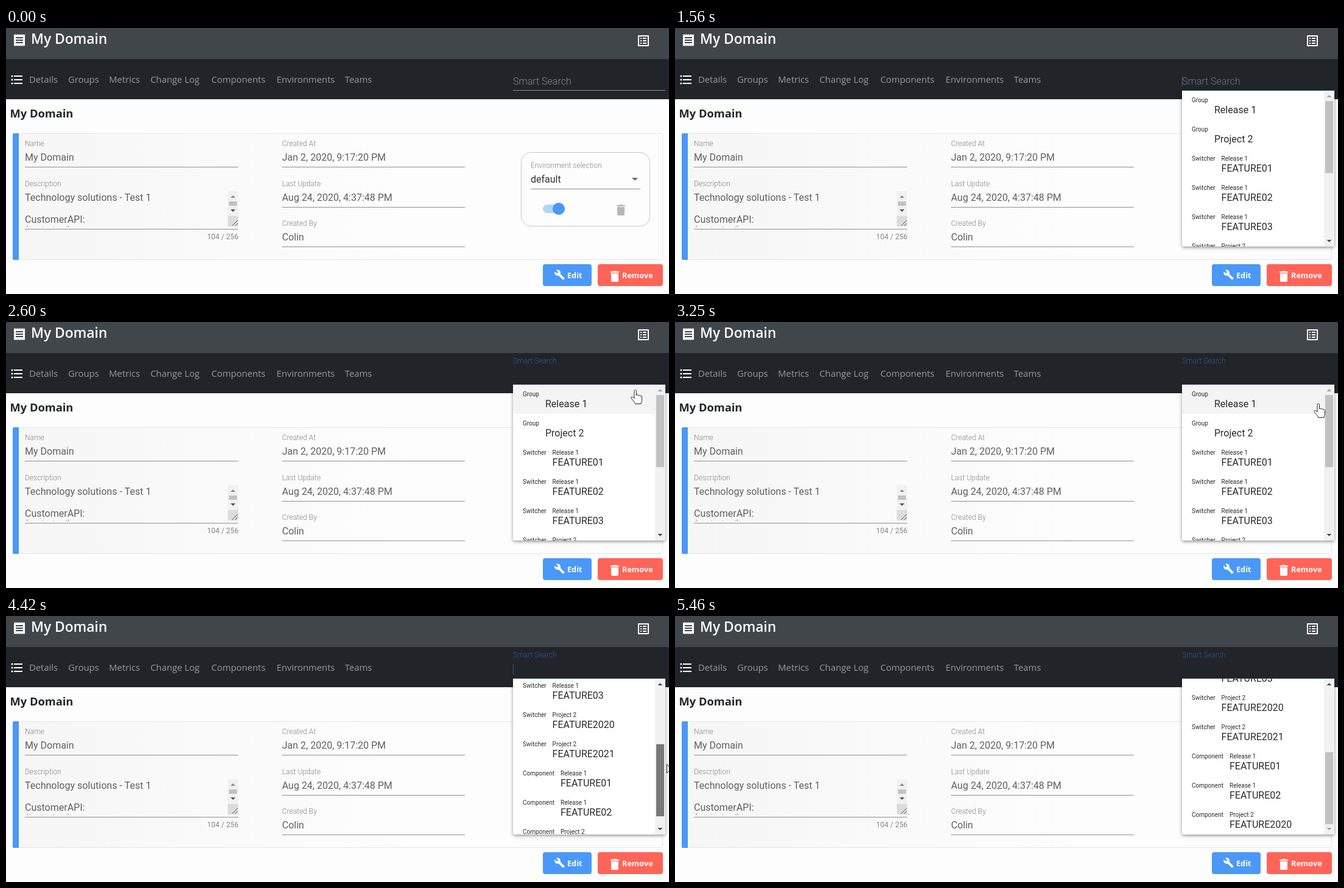
Recreate the animation shown at these times as an HTML page. Size 1088 by 437 pixels, loop 5590 ms.

```html
<!DOCTYPE html>
<html lang="en">
<head>
<meta charset="utf-8">
<title>Domain smart search</title>
<style>
  html, body { margin: 0; width: 100%; height: 100%; overflow: hidden; background: #fdfdfd; }
  svg { display: block; }
  text { font-family: Roboto, "Liberation Sans", sans-serif; font-size: 16px; white-space: pre; }
  .ui text, text.ui { font-family: "Open Sans", "Noto Sans", sans-serif; }
  .nav text { font-size: 14.8px; fill: #96999c; }
  .value text { fill: #606060; }
  .label text { font-size: 12px; font-weight: 300; fill: #858585; }
  .rule { stroke: #909090; }
  .button text { font-size: 12.7px; font-weight: 700; fill: #fff; }
  .tip text { font-size: 10px; fill: #fff; stroke: #fff; stroke-width: .3px; }
  .row text { fill: #2b2b2b; }
  .row .small { font-size: 10px; }
  #panelBox { filter: drop-shadow(0 2px 2px rgba(0,0,0,.25)) drop-shadow(0 1px 3px rgba(0,0,0,.2)); }
  .cursor { fill: #fff; stroke: #222; stroke-width: 1; stroke-linejoin: round; }
</style>
</head>
<body>
<svg width="1088" height="437" viewBox="0 0 1088 437">
  <defs>
    <linearGradient id="cardFill">
      <stop offset="0" stop-color="#f6f6f6"/>
      <stop offset=".6" stop-color="#fdfdfd"/>
    </linearGradient>
    <clipPath id="panelClip"><rect x="832" y="103" width="250" height="256" rx="3"/></clipPath>
    <clipPath id="areaClip"><rect x="31" y="268" width="333" height="58.5"/></clipPath>
    <path id="bin" d="M6 19c0 1.1.9 2 2 2h8c1.1 0 2-.9 2-2V7H6v12zM19 4h-3.5l-1-1h-5l-1 1H5v2h14V4z"/>
  </defs>

  <!-- header and navigation -->
  <rect width="1088" height="51" fill="#41464b"/>
  <rect y="51" width="1088" height="66" fill="#212529"/>
  <g fill="#fff">
    <path transform="translate(10 8)" d="M18 17H6v-2h12v2zm0-4H6v-2h12v2zm0-4H6V7h12v2zM3 22l1.5-1.5L6 22l1.5-1.5L9 22l1.5-1.5L12 22l1.5-1.5L15 22l1.5-1.5L18 22l1.5-1.5L21 22V2l-1.5 1.5L18 2l-1.5 1.5L15 2l-1.5 1.5L12 2l-1.5 1.5L9 2 7.5 3.5 6 2 4.5 3.5 3 2v20z"/>
    <path transform="translate(1034 9)" d="M19 5v14H5V5h14m1.1-2H3.9c-.5 0-.9.4-.9.9v16.2c0 .4.4.9.9.9h16.2c.4 0 .9-.5.9-.9V3.9c0-.5-.5-.9-.9-.9zM11 7h6v2h-6V7zm0 4h6v2h-6v-2zm0 4h6v2h-6zM7 7h2v2H7zm0 4h2v2H7zm0 4h2v2H7z"/>
    <g transform="translate(6 73)">
      <circle cx="4" cy="6" r="1.5"/><circle cx="4" cy="12" r="1.5"/><circle cx="4" cy="18" r="1.5"/>
      <path d="M7 5h14v2H7zM7 11h14v2H7zM7 17h14v2H7z"/>
    </g>
    <text class="ui" x="41" y="26" style="font-size:22.7px;font-weight:600">My Domain</text>
  </g>
  <g class="ui nav">
    <text x="38" y="90">Details</text>
    <text x="102" y="90">Groups</text>
    <text x="169" y="90">Metrics</text>
    <text x="237" y="90">Change Log</text>
    <text x="337" y="90">Components</text>
    <text x="444" y="90">Environments</text>
    <text x="556" y="90">Teams</text>
  </g>
  <rect id="searchLine" x="832" y="102" width="250" height="1"/>
  <text id="searchLabel" font-weight="300">Smart Search</text>
  <rect id="caret" x="832" y="79" width="1" height="17" fill="#3a5a8c"/>

  <!-- domain card -->
  <text class="ui" x="6.500" y="147" fill="#212529" style="font-size:18.3px;font-weight:700">My Domain</text>
  <rect x="11.500" y="173.500" width="1066" height="207" rx="2" fill="url(#cardFill)" stroke="#e6e6e6"/>
  <path d="M13 173h8v208h-8a2 2 0 0 1-2-2V175a2 2 0 0 1 2-2z" fill="#4a98f7"/>
  <g class="label">
    <text x="31" y="194">Name</text>
    <text x="31" y="260">Description</text>
    <text x="453" y="194">Created At</text>
    <text x="453" y="260">Last Update</text>
    <text x="453" y="325">Created By</text>
    <text x="330" y="347" style="font-weight:400">104 / 256</text>
  </g>
  <g class="value">
    <text x="31" y="218">My Domain</text>
    <g clip-path="url(#areaClip)">
      <text x="31" y="284">Technology solutions - Test 1</text>
      <text x="31" y="320">CustomerAPI:</text>
      <text x="31" y="338">(technical)</text>
    </g>
    <text x="453" y="218">Jan 2, 2020, 9:17:20 PM</text>
    <text x="453" y="284">Aug 24, 2020, 4:37:48 PM</text>
    <text x="453" y="349">Colin</text>
  </g>
  <path class="rule" d="M31 228.500h350M31 330.500h350M453 228.500h300M453 294.500h300M453 359.500h300"/>
  <rect x="364" y="268" width="17" height="41" fill="#f1f1f1"/>
  <rect x="366" y="285" width="13" height="7" fill="#c1c1c1"/>
  <path d="M368.500 279l4-4 4 4z" fill="#8c8c8c"/>
  <path d="M368.500 298l4 4 4-4z" fill="#505050"/>
  <rect x="364" y="309" width="17" height="17" fill="#dcdcdc"/>
  <path d="M371 325l9-9M376 325l4-4" stroke="#555"/>

  <!-- environment box -->
  <rect x="845.500" y="204.500" width="211" height="121" rx="16" fill="#fdfdfd" stroke="#c6c6c6"/>
  <g class="label"><text x="861" y="230">Environment selection</text></g>
  <text x="861" y="254" fill="#333">default</text>
  <path class="rule" d="M861 264.500h180"/>
  <path d="M1027 246h10l-5 5z" fill="#707070"/>
  <rect x="881" y="290" width="36" height="14" rx="7" fill="#b0d5fb"/>
  <circle cx="907" cy="297" r="10" fill="#4a98f7"/>
  <use href="#bin" x="997" y="287" fill="#bab7b6"/>

  <g class="ui button">
    <rect x="881" y="388" width="80" height="36" rx="4" fill="#4a98f7"/>
    <path transform="translate(899.500 396.500) scale(.75)" fill="#fff" d="M22.700 19l-9.100-9.100c.9-2.300.4-5-1.500-6.900-2-2-5-2.400-7.400-1.300L9 6 6 9 1.600 4.700C.4 7.100.9 10.100 2.900 12.100c1.900 1.900 4.600 2.400 6.900 1.500l9.100 9.100c.4.4 1 .4 1.400 0l2.300-2.300c.5-.4.5-1.100.1-1.400z"/>
    <text x="921" y="411">Edit</text>
    <rect x="971" y="388" width="107" height="36" rx="4" fill="#ff6458"/>
    <use href="#bin" x="987" y="396" fill="#fff"/>
    <text x="1011" y="411">Remove</text>
  </g>

  <g id="tip" class="tip">
    <rect x="832" y="110" width="250" height="42" rx="4" fill="#616161" fill-opacity=".9"/>
    <text x="840" y="127">Use 'S:' for Switchers, 'G:' for Groups and 'C:' for</text>
    <text x="840" y="142">Components</text>
  </g>

  <!-- search results -->
  <g id="panel">
    <path id="panelBox" d="M832 103h250v253a3 3 0 0 1-3 3h-244a3 3 0 0 1-3-3z" fill="#fff"/>
    <g clip-path="url(#panelClip)">
      <g id="rows"><rect id="hover" x="832" y="103" width="233" height="48" fill="#f4f4f4"/></g>
      <rect x="1065" y="103" width="17" height="256" fill="#f1f1f1"/>
      <rect id="thumb" x="1067" width="13" height="118.400"/>
      <path id="up" d="M1069.500 114l4-4 4 4z"/>
      <path id="down" d="M1069.500 348l4 4 4-4z"/>
    </g>
  </g>
  <path id="hand" class="cursor" d="M0 2c0-2.500 3.500-2.500 3.500 0v7c.6-1.400 3-1.200 3.300.4.800-1.100 2.800-.8 3.100.7 1-.8 2.600-.2 2.600 1.400v5.500c0 2-1.500 3-1.500 6H1.500c0-2.500-4.500-6-6.500-9.500-1-1.800 1.300-3 2.700-1.700L0 14z"/>
  <path id="arrow" class="cursor" d="M.5.500v14.500l3.400-3.200 2.300 5.200 2.400-1-2.300-5.100h4.700z"/>
</svg>
<script>
const LOOP = 5590, STEP = 130;
const FOCUS = 1560, FLOAT = 650, BLINK = 1040;
const MAX_SCROLL = 224, THUMB_TRAVEL = 103.6;
const $ = id => document.getElementById(id);

const results = [
  ["Group", "", "Release 1"], ["Group", "", "Project 2"],
  ["Switcher", "Release 1", "FEATURE01"], ["Switcher", "Release 1", "FEATURE02"],
  ["Switcher", "Release 1", "FEATURE03"], ["Switcher", "Project 2", "FEATURE2020"],
  ["Switcher", "Project 2", "FEATURE2021"], ["Component", "Release 1", "FEATURE01"],
  ["Component", "Release 1", "FEATURE02"], ["Component", "Project 2", "FEATURE2020"]
];
const nameX = { Group: 885, Switcher: 896.6, Component: 910 };

$("rows").insertAdjacentHTML("beforeend", results.map(([kind, parent, name], i) => {
  const y = 103 + 48 * i, x = nameX[kind];
  return `<g class="row"><text class="small" x="848" y="${y + 19}">${kind}</text>` +
    `<text class="small" x="${x}" y="${y + 19}">${parent}</text>` +
    `<text x="${x}" y="${y + 37}">${name}</text></g>`;
}).join(""));

// Linear interpolation through [time, value] points
function track(points, t) {
  const i = points.findIndex(p => p[0] > t);
  if (i === 0) return points[0][1];
  if (i < 0) return points[points.length - 1][1];
  const [t0, v0] = points[i - 1], [t1, v1] = points[i];
  return v0 + (v1 - v0) * (t - t0) / (t1 - t0);
}

const scrollPath = [[3640, 0], [3770, 16], [3900, 49], [4420, 196], [4550, 214], [4680, MAX_SCROLL]];
const tipFade = [[520, 0], [650, .4], [780, .89], [910, 1]];
const handX = [[2600, 1031], [3120, 1050], [3250, 1054]];
const handY = [[2600, 111.500], [3120, 128], [3250, 134]];
const arrowX = [[3510, 1074], [3640, 1076], [3900, 1076], [4420, 1084], [4810, 1086], [5200, 1089]];

const show = (el, on) => el.setAttribute("visibility", on ? "visible" : "hidden");
const move = (el, x, y, s = 1) => el.setAttribute("transform", `translate(${x} ${y}) scale(${s})`);
const fill = (el, color) => el.setAttribute("fill", color);

function draw(t) {
  const focused = t >= FOCUS;

  const p = Math.min(Math.max((t - FOCUS) / FLOAT, 0), 1);
  const lift = 1 - (1 - p) ** 3;
  move($("searchLabel"), 832, 93 - 24.7 * lift, 1 - .25 * lift);
  fill($("searchLabel"), t < FOCUS ? "#868a8d" : p === 0 ? "#73777a" : "#34568c");
  fill($("searchLine"), focused ? "#2d4a78" : "#8d9093");
  show($("caret"), focused && (t - FOCUS) % (2 * BLINK) < BLINK);

  $("tip").setAttribute("opacity", focused ? 0 : track(tipFade, t));

  const scroll = track(scrollPath, t);
  const thumbY = 120 + scroll / MAX_SCROLL * THUMB_TRAVEL;
  const onBar = t >= 3510, drag = t >= 3640 && t < 5200;
  show($("panel"), focused);
  move($("rows"), 0, -scroll);
  $("hover").setAttribute("opacity", t >= 2600 && !onBar ? 1 : 0);
  $("thumb").setAttribute("y", thumbY);
  fill($("thumb"), drag ? "#787878" : onBar && t < 3640 ? "#a8a8a8" : "#c1c1c1");
  fill($("up"), scroll > 0 ? "#505050" : "#a3a3a3");
  fill($("down"), scroll < MAX_SCROLL ? "#505050" : "#a3a3a3");

  show($("hand"), t >= 2600 && !onBar);
  move($("hand"), track(handX, t), track(handY, t));
  show($("arrow"), onBar && t < 5200);
  move($("arrow"), track(arrowX, t), thumbY + 32.5);
}

const start = performance.now();
function tick() {
  const t = (performance.now() - start) % LOOP;
  draw(Math.floor(t / STEP) * STEP);
  requestAnimationFrame(tick);
}
tick();
</script>
</body>
</html>
```
